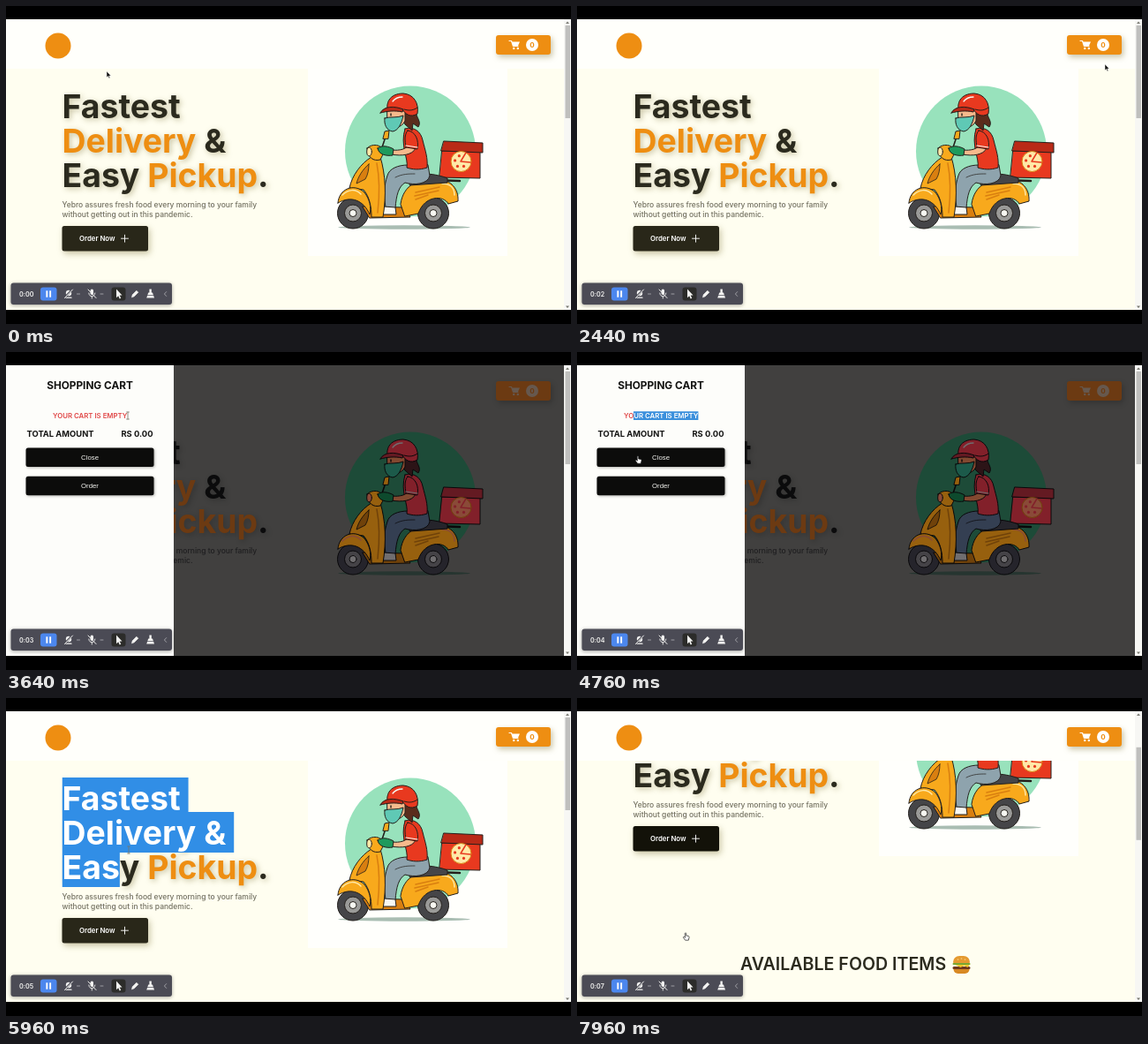
Animation, 640 px wide and 360 px high, one loop 8 s. Source, as an HTML page with a canvas:

```html
<!DOCTYPE html>
<html lang="en">
<head>
<meta charset="utf-8">
<title>Food delivery page</title>
<style>
html, body { margin: 0; width: 100%; height: 100%; overflow: hidden; background: #000; }
canvas { display: block; width: 640px; height: 360px; }
</style>
</head>
<body>
<canvas id="stage"></canvas>
<script>
const LOOP = 8000, W = 640, H = 360, TOP = 15, BOTTOM = 344;
const SANS = 'Inter, sans-serif', ARIAL = '"Liberation Sans", Arial, sans-serif';
const SELECT = '#318ee6', PANEL_W = 190;

const DAY = {
  page: '#fffef0', head: '#fffffb', card: '#fffffc', text: '#2b2a1e', accent: '#ee8e12',
  sub: '#727061', button: '#292719', label: '#ffffff', shadow: 'rgba(120,110,50,.4)',
  circle: '#98e2bc', ground: '#a9bdb2', ink: '#24201c', tire: '#454548', hub: '#9a9a98',
  gold: '#f8a91c', goldDark: '#d97f10', light: '#ffe9a8', red: '#e8391f', redDark: '#b92a17',
  skin: '#f6b98c', mask: '#5fc9b5', glove: '#1f9a5c', hair: '#5a2c1c', denim: '#8ea3ad', white: '#f8f8f2'
};
const DIM = {
  page: '#41403f', head: '#41403f', card: '#41403f', text: '#0b0b0c', accent: '#6c3a12',
  sub: '#1f1e20', button: '#0d0d0e', label: '#66584e', shadow: 'rgba(0,0,0,.2)',
  circle: '#1d4b38', ground: '#263530', ink: '#09080a', tire: '#25242b', hub: '#454347',
  gold: '#97600e', goldDark: '#70420a', light: '#8a4a38', red: '#82202a', redDark: '#641a22',
  skin: '#824830', mask: '#1c5a4a', glove: '#0d4a2d', hair: '#2c1417', denim: '#343f52', white: '#706e70'
};

const stage = document.getElementById('stage'), buffer = document.createElement('canvas');
const ratio = window.devicePixelRatio || 1;
const [front, back] = [stage, buffer].map(canvas => {
  canvas.width = W * ratio;
  canvas.height = H * ratio;
  const ctx = canvas.getContext('2d');
  ctx.scale(ratio, ratio);
  return ctx;
});
let g = front;

const clamp = v => Math.max(0, Math.min(1, v));
const span = (t, a, b) => clamp((t - a) / (b - a));
const smooth = u => u * u * (3 - 2 * u);

function rect(x, y, w, h, fill, r = 0) {
  g.fillStyle = fill;
  g.beginPath();
  g.roundRect(x, y, w, h, r);
  g.fill();
}
function oval(x, y, rx, ry, fill, line) {
  g.beginPath();
  g.ellipse(x, y, rx, ry, 0, 0, Math.PI * 2);
  if (fill) { g.fillStyle = fill; g.fill(); }
  if (line) { g.strokeStyle = line; g.lineWidth = 1; g.stroke(); }
}
function shape(d, fill, line, width = 1) {
  const path = new Path2D(d);
  if (fill) { g.fillStyle = fill; g.fill(path); }
  if (line) {
    g.strokeStyle = line;
    g.lineWidth = width;
    g.lineJoin = g.lineCap = 'round';
    g.stroke(path);
  }
}
function font(size, weight, family = SANS) { g.font = `${weight} ${size}px ${family}`; }
function text(str, x, y, size, weight, fill, align = 'left', family = SANS) {
  font(size, weight, family);
  g.textAlign = align;
  g.fillStyle = fill;
  g.fillText(str, x, y);
}
function glow(color, blur, dx, dy, draw) {
  g.save();
  g.shadowColor = color;
  g.shadowBlur = blur * ratio;
  g.shadowOffsetX = dx * ratio;
  g.shadowOffsetY = dy * ratio;
  draw();
  g.restore();
}

// Headline as coloured runs, one list per line
const HEAD = [
  [['Fastest', 'text']],
  [['Delivery', 'accent'], [' &', 'text']],
  [['Easy ', 'text'], ['Pickup', 'accent'], ['.', 'text']]
];
const HEAD_X = 63.5, HEAD_Y = 127, LEADING = 39, HEAD_SIZE = 37.4;
const lineText = row => HEAD[row].map(run => run[0]).join('');

function headline(c, override) {
  font(HEAD_SIZE, 700);
  g.textAlign = 'left';
  HEAD.forEach((runs, row) => {
    let x = HEAD_X;
    for (const [str, key] of runs) {
      g.fillStyle = override || c[key];
      g.fillText(str, x, HEAD_Y + row * LEADING);
      x += g.measureText(str).width;
    }
  });
}

// Width of a line up to the caret nearest to x
function caretWidth(str, x) {
  let width = 0;
  for (let i = 1; i <= str.length; i++) {
    const next = g.measureText(str.slice(0, i)).width;
    if (x < HEAD_X + (width + next) / 2) break;
    width = next;
  }
  return width;
}
function headSelection(c, x, y) {
  const last = Math.max(0, Math.min(2, Math.floor((y - 90) / LEADING)));
  const area = new Path2D();
  font(HEAD_SIZE, 700);
  for (let row = 0; row <= last; row++) {
    const str = lineText(row);
    const w = row < last ? g.measureText(str + ' ').width : caretWidth(str, x);
    area.rect(HEAD_X, HEAD_Y + row * LEADING - 37, w, 46);
  }
  g.save();
  g.clip(area);
  g.fillStyle = SELECT;
  g.fillRect(HEAD_X, 85, 300, 135);
  headline(c, '#fff');
  g.restore();
}

function wheel(x, c) {
  oval(x, 234.5, 17.5, 17.5, c.tire, c.ink);
  oval(x, 234.5, 9.5, 9.5, c.hub, c.ink);
  oval(x, 234.5, 4, 4, c.white, c.ink);
}

function scooter(c) {
  const part = (d, key) => shape(d, c[key], c.ink);
  oval(458, 164.5, 74, 74, c.circle);
  oval(451, 250.5, 75, 2.2, c.ground);
  wheel(484, c);
  wheel(393, c);

  shape('M486 197L514 198', null, c.ink, 2.5);
  part('M494 164L537 165L537 195L491 194Z', 'red');
  part('M496 153L540 155L540 166L493 164Z', 'redDark');
  oval(515.5, 176, 11.5, 11.5, c.light, c.goldDark);
  shape('M515 176L521 166M515 176L526 177', null, c.red, 1.5);
  for (let i = 0; i < 4; i++) {
    const a = 1 + i * 1.15;
    oval(515 + 6.5 * Math.cos(a), 176 + 6.5 * Math.sin(a), 1.6, 1.6, c.red);
  }

  part('M404 227L452 228L458 239L412 240Z', 'goldDark');
  part('M447 224C450 202 468 194 490 196C504 197 513 207 512 221L501 224C496 214 474 214 467 235L452 238Z', 'gold');
  shape('M464 211L491 205M463 215L490 209M464 219L478 214', null, c.goldDark, 1.5);
  shape('M494 201C503 201 508 206 508 214', null, c.light, 1.5);
  part('M454 194C466 187 488 190 500 195L500 200L458 203Z', 'tire');

  part('M455 180C444 180 434 184 432 192C428 204 428 214 430 228L441 229C442 214 445 204 452 200C462 203 478 202 480 192L478 180Z', 'denim');
  shape('M441 194C449 190 456 190 463 190', null, c.ink, .7);
  part('M428 227L441 228L442 236L421 236C421 231 426 231 428 227Z', 'white');

  part('M414 171C402 178 392 192 389 206L405 208C412 216 414 228 414 239L427 239C431 215 430 190 424 171Z', 'gold');
  shape('M411 179C404 185 399 193 397 201L407 196C410 191 411 185 411 179Z', c.goldDark, c.ink, .8);
  shape('M420 178C424 198 423 216 421 234', null, c.goldDark, 1.5);
  part('M376 223C377 207 394 200 406 211C412 219 414 228 412 236C405 220 391 214 376 223Z', 'gold');
  shape('M381 214C388 207 396 207 402 213', null, c.light, 1.5);
  part('M409 161C416 154 428 158 428 166L424 174C416 176 410 172 409 161Z', 'gold');
  oval(411.5, 165, 2.8, 4.8, c.light, c.ink);
  shape('M424 162L438 166M426 160L429 151', null, c.ink, 1.6);
  part('M427 150L429 142L434 141L433 150Z', 'gold');

  part('M452 139C462 136 470 142 472 152C475 164 478 172 477 183C468 186 460 185 454 183C456 172 446 158 452 139Z', 'red');
  part('M456 157L464 161C460 169 448 170 437 168L437 163C446 164 454 162 456 157Z', 'skin');
  part('M455 141C464 142 468 152 466 162L453 160C452 152 451 146 455 141Z', 'red');
  shape('M453 158L466 160', null, c.white, 1.2);
  part('M421 161C426 157 434 159 439 162L438 169C432 170 422 169 421 161Z', 'glove');

  part('M446 119L464 119C465 127 471 131 467 137L461 133L460 141L452 134Z', 'hair');
  part('M432 117L452 117L452 130C448 139 436 140 432 134Z', 'skin');
  shape('M436 122L436 124', null, c.ink, 1.4);
  part('M429 127C434 125 444 127 450 124C448 134 444 141 438 142C431 141 428 134 429 127Z', 'mask');
  part('M432 118C430 104 440 99 450 99C462 100 468 110 466 122C458 127 452 122 449 117Z', 'red');
  part('M424 121C428 113 440 113 450 117L449 120C440 118 432 119 424 121Z', 'redDark');
  shape('M438 108C441 104 445 103 449 103', null, c.white, 1.3);
  shape('M451 117C457 119 462 118 466 115', null, c.ink, 1);
}

function burger(x, y) {
  rect(x - 9, y + 4, 18, 6, '#d88924', [1, 1, 5, 5]);
  rect(x - 10, y + 2, 20, 3, '#713a1e', 1.5);
  shape(`M${x - 10} ${y - 1}h20l-3 4l-4 -2l-4 2l-4 -2z`, '#f5c62a');
  rect(x - 10, y - 2, 20, 2, '#79a834', 1);
  rect(x - 9.5, y - 10, 19, 8, '#e59a30', [8, 8, 1, 1]);
  for (let i = -1; i < 2; i++) oval(x + i * 4, y - 6 - (i ? 0 : 1), .9, .6, '#ffe6a0');
}

function cartButton(c) {
  glow(c.shadow, 6, 2, 3, () => rect(555, 33, 62, 22, c.accent, 3));
  shape('M570 39.5H572.5L574.5 45.5H580', null, c.label, 1.2);
  shape('M573 40.5H582L580 45H574.5Z', c.label);
  oval(575.2, 48, 1.2, 1.2, c.label);
  oval(579.8, 48, 1.2, 1.2, c.label);
  oval(596, 44, 7, 7, c.label);
  text('0', 596, 46.9, 8, 700, c.accent, 'center');
}

function page(c, scroll, select, pressed) {
  rect(0, TOP, W, BOTTOM - TOP, c.page);
  g.save();
  g.translate(0, -scroll);
  rect(342, 71, 226, 212, c.card);
  scooter(c);
  glow(c.shadow, 6, 2, 2, () => headline(c));
  if (select) headSelection(c, ...select);
  text('Yebro assures fresh food every morning to your family', 63.5, 228, 8.5, 500, c.sub);
  text('without getting out in this pandemic.', 63.5, 238.5, 8.5, 500, c.sub);
  glow(c.shadow, 7, 2, 3, () => rect(63.5, 249, 97.5, 28.5, pressed ? '#131209' : c.button, 2.5));
  text('Order Now', 83, 266, 7.8, 600, c.label);
  shape('M130.5 263.2H138.5M134.5 259.2V267.2', null, c.label, .9);
  if (scroll) {
    text('AVAILABLE FOOD ITEMS', 185, 412, 19.6, 600, c.text);
    burger(435.5, 406);
  }
  g.restore();
  rect(0, TOP, W, 56, c.head);
  oval(59, 45, 14.5, 14.5, c.accent);
  cartButton(c);
}

function panel(t, open) {
  const label = 'YOUR CART IS EMPTY', dark = '#141413';
  g.save();
  g.translate((open - 1) * PANEL_W, 0);
  g.globalAlpha = Math.min(1, open * 1.55);
  rect(0, TOP, PANEL_W, BOTTOM - TOP, '#fdfdfa');
  text('SHOPPING CART', 95, 42, 11.8, 700, dark, 'center');
  text(label, 53, 75, 7.8, 600, '#e04848');
  const end = 53 + g.measureText(label).width;
  const x = end - (end - 64) * smooth(span(t, 3700, 4250));
  if (x < end) {
    g.save();
    g.beginPath();
    g.rect(x, 67.3, end - x, 9.7);
    g.clip();
    g.fillStyle = '#3a8fdc';
    g.fillRect(0, 60, PANEL_W, 25);
    text(label, 53, 75, 7.8, 600, '#fff');
    g.restore();
  }
  text('TOTAL AMOUNT', 23.5, 96.3, 9.4, 700, dark);
  text('RS 0.00', 166.5, 96.3, 9.4, 700, dark, 'right');
  ['Close', 'Order'].forEach((name, i) => {
    const y = 108.5 + i * 32.3;
    glow('rgba(70,70,65,.4)', 3, 1, 1, () => rect(22.5, y, 145, 21.5, '#0c0c0b', 2.5));
    text(name, 95, y + 13.4, 7.8, 400, '#f4f4f0', 'center', ARIAL);
  });
  g.restore();
}

function scrollbar(scroll) {
  rect(632, TOP, 8, BOTTOM - TOP, '#f7f7f4');
  rect(633.5, 22 + scroll * .325, 5.5, 105, '#bfbfbd');
  shape('M634 20L636 17.5L638 20Z', '#77776f');
  shape('M634 339.5L636 342L638 339.5Z', '#77776f');
}

function toolbar(t) {
  const ink = '#f4f4f2';
  glow('rgba(0,0,0,.35)', 4, 0, 1, () => rect(5.5, 313.5, 182.5, 24.5, '#4b4b55', 3));
  text(`0:0${Math.floor(t / 1000)}`, 15, 328.6, 7.2, 600, ink);
  rect(39, 318.5, 18.5, 15, '#4c87ee', 3);
  rect(45.4, 322.3, 1.9, 7.4, '#fff');
  rect(49.2, 322.3, 1.9, 7.4, '#fff');

  oval(71, 325, 3.2, 3.2, ink);
  shape('M67.5 330.2H74', null, ink, 1.2);
  shape('M66.5 330L75.5 320.5', null, '#4b4b55', 2.2);
  shape('M66.5 330.5L75.5 321', null, ink, 1);
  shape('M80.5 326H83.5M107 326H110', null, '#a5a5ab', .9);

  rect(95.6, 320.5, 3.4, 6.5, ink, 1.7);
  shape('M93.8 325C94 330 100.5 330 100.8 325M97.3 329V331', null, ink, .9);
  shape('M93 321L102 330.5', null, ink, 1);

  rect(119.5, 318.5, 16, 15, '#2c2c2a', 3);
  shape('M125 320.5V330.2L127.2 328.2L128.7 331.4L130.2 330.7L128.7 327.6H131.5Z', ink);
  shape('M142.5 329.5L143.2 326.8L147.8 322.2L149.8 324.2L145.2 328.8Z', ink, ink, .6);
  shape('M162.4 320.5H164.8V324.5H166L168 330.5H159.2L161.2 324.5H162.4Z', ink);
  shape('M160 327.5H167', null, '#4b4b55', .7);
  shape('M181.6 323.6L179.4 326L181.6 328.4', null, '#a5a5ab', .9);
}

// Pointer stops: time, x, y
const STOPS = [
  [0, 114, 74], [840, 300, 150], [1600, 470, 120], [2440, 598, 66], [2700, 596, 44],
  [2800, 596, 44], [3160, 144, 51], [3550, 138, 72], [3700, 138, 72], [4250, 64, 72],
  [4350, 64, 72], [4760, 69, 118], [4950, 69, 118], [5350, 66, 100], [5450, 66, 100],
  [5960, 139, 172], [6250, 139, 172], [6650, 230, 225], [7300, 123, 258], [7600, 123, 258], [7960, 123, 266]
];
// Pointer look and the time until which it holds
const LOOKS = [
  [2600, 'arrow'], [2850, 'hand'], [3500, 'arrow'], [4400, 'beam'], [5050, 'hand'],
  [5250, 'arrow'], [6300, 'beam'], [7050, 'arrow'], [LOOP, 'hand']
];

function pointerAt(t) {
  const i = STOPS.findIndex(stop => stop[0] > t);
  if (i < 0) return STOPS[STOPS.length - 1].slice(1);
  const [ta, xa, ya] = STOPS[i - 1], [tb, xb, yb] = STOPS[i];
  const u = smooth(span(t, ta, tb));
  return [xa + (xb - xa) * u, ya + (yb - ya) * u];
}

function pointer(t, x, y) {
  const look = LOOKS.find(entry => t < entry[0])[1];
  g.save();
  g.translate(x, y);
  if (look === 'arrow') {
    shape('M0 0V6.8L1.6 5.4L2.7 7.8L3.8 7.3L2.7 5H4.8Z', '#111', '#f4f4f0', .5);
  } else if (look === 'hand') {
    shape('M-.8 .6C-.8 -.5 .7 -.5 .7 .6V3L3 3.4C4 3.6 4.2 4.2 4 5.2L3.3 8.2H-.4L-2.6 5.2C-2.9 4.4 -2 4 -1.4 4.5L-.8 5Z', '#fff', '#1c1c1c', .7);
  } else {
    shape('M-1.4 -4H1.4M0 -4V4M-1.4 4H1.4', null, '#77776a', .8);
  }
  g.restore();
}

function draw(t) {
  const scroll = 104 * Math.pow(span(t, 7580, 7960), 1.6);
  const open = t < 4000 ? smooth(span(t, 2800, 3466)) : 1 - smooth(span(t, 4920, 5400));
  const [x, y] = pointerAt(t);
  const drag = t > 5450 && t < 6450 ? pointerAt(Math.min(t, 6000)) : null;

  g = front;
  rect(0, 0, W, H, '#000');
  g.save();
  g.beginPath();
  g.rect(0, TOP, W, BOTTOM - TOP);
  g.clip();
  page(DAY, scroll, drag, t > 7600);
  if (open > 0) {
    g = back;
    page(DIM, 0);
    g = front;
    g.globalAlpha = Math.min(1, open * 2);
    g.drawImage(buffer, 0, 0, W, H);
    g.globalAlpha = 1;
    panel(t, open);
  }
  scrollbar(scroll);
  toolbar(t);
  pointer(t, x, y);
  g.restore();
}

function tick() {
  draw(performance.now() % LOOP);
  requestAnimationFrame(tick);
}
tick();
</script>
</body>
</html>
```
